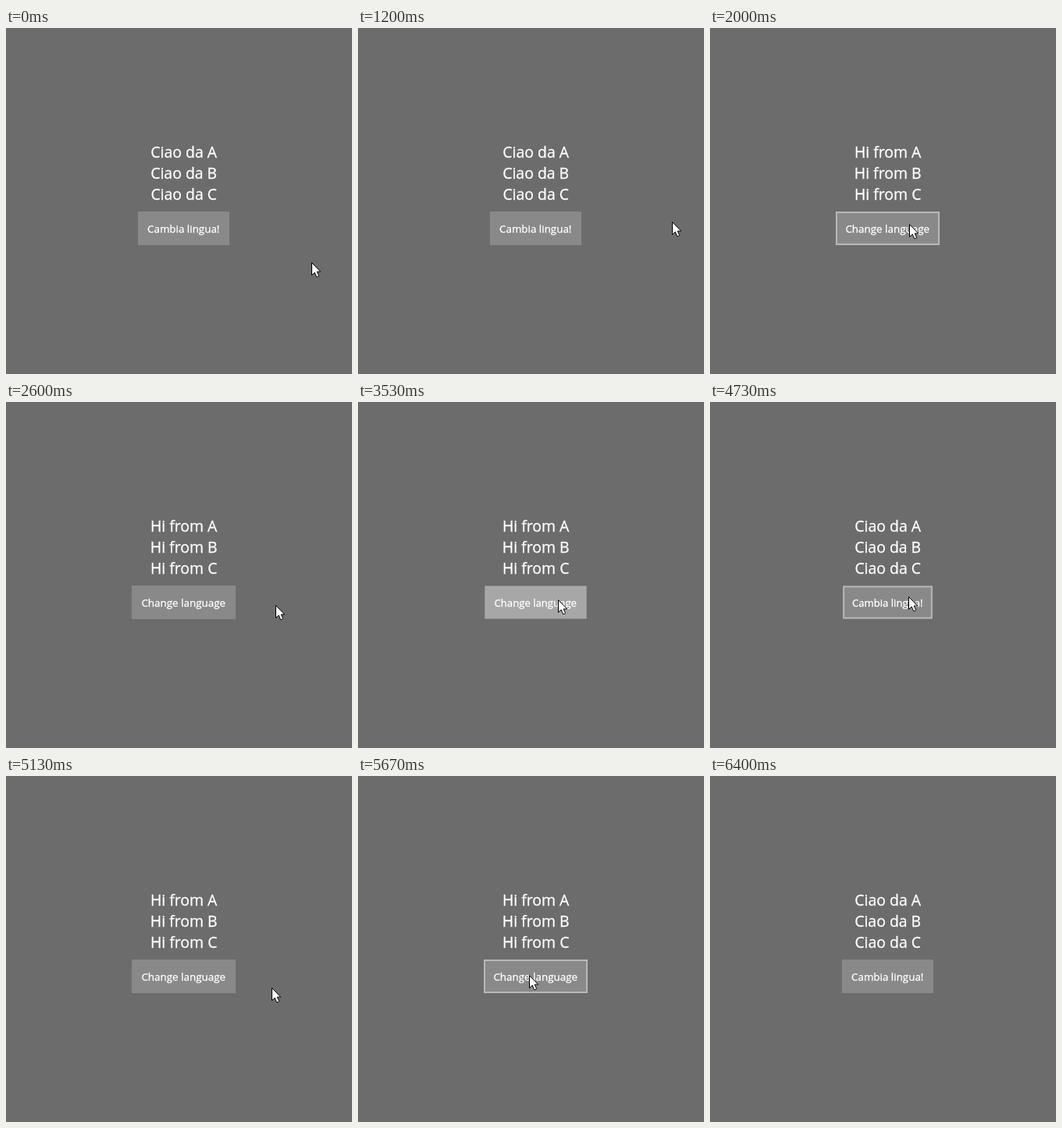
These frames come from a looping animation (443 px wide and 443 px high, 6.87 s). An HTML page:

```html
<!DOCTYPE html>
<html lang="it">
<head>
<meta charset="utf-8">
<title>Cambia lingua</title>
<style>
  html, body { margin: 0; width: 100%; height: 100%; overflow: hidden; background: #6c6c6c; }
  svg { display: block; width: 100%; height: 100%; }
  text {
    font-family: "Open Sans", "Noto Sans", sans-serif;
    fill: #fff; stroke: #fff; stroke-width: .3; text-anchor: middle;
  }
  .greeting { font-size: 19.4px; }
  .label { font-size: 13.4px; }
</style>
</head>
<body>
<svg viewBox="0 0 443 443">
  <text class="greeting" x="227.7" y="166"></text>
  <text class="greeting" x="227.7" y="193"></text>
  <text class="greeting" x="227.7" y="220"></text>
  <g id="button">
    <rect id="face" y="-21.5" height="43" fill="#fff"/>
    <rect id="border" y="-20.5" height="41" fill="none" stroke="#fff" stroke-opacity=".4" stroke-width="2"/>
    <text id="label" class="label" x="-.3" y="5.5"></text>
  </g>
  <path id="cursor" d="M.5 .5V16.5L4.2 13L6.5 18.5H8.5L9.5 17L7.2 12H11.7Z" fill="#fff" stroke="#000" stroke-linejoin="round"/>
</svg>
<script>
const LOOP = 6870, STEP = 1000 / 15;
const CENTER = { x: 227.5, y: 256.5 };
const ITALIAN = { greeting: "Ciao da ", label: "Cambia lingua!", width: 117 };
const ENGLISH = { greeting: "Hi from ", label: "Change language", width: 133 };
const REST = 3, PRESS = 2;  // steps on the button before a press, and held down

const spot = (step, x, y) => ({ step, x, y });
const clicks = [spot(28, 255, 251), spot(52, 256, 253), spot(71, 254, 249), spot(87, 219, 255)];
// The pointer enters at the first turn, swings out between clicks and leaves at the last
const turns = [spot(18, 402, 248), spot(43, 371, 263), spot(65, 370, 276), spot(80, 395, 286), spot(95, 59, 432)];
const stops = turns.flatMap((turn, i) => {
  const click = clicks[i];
  return click
    ? [turn, { ...click, step: click.step - REST }, { ...click, step: click.step + PRESS }]
    : [turn];
});

const $ = id => document.getElementById(id);
const greetings = [...document.querySelectorAll(".greeting")];
const ease = u => u * u * (3 - 2 * u);
const setAttrs = (el, attrs) => {
  for (const name in attrs) el.setAttribute(name, attrs[name]);
};

function pointerAt(step) {
  if (step < 1) return { x: 391, y: 300 };
  const next = stops.findIndex(stop => stop.step > step);
  if (next === 0) return null;
  if (next < 0) return stops.at(-1).step === step ? stops.at(-1) : null;
  const a = stops[next - 1], b = stops[next];
  const u = ease((step - a.step) / (b.step - a.step));
  return { x: Math.round(a.x + (b.x - a.x) * u), y: Math.round(a.y + (b.y - a.y) * u) };
}

function draw(time) {
  const step = Math.floor((time + 4) / STEP);
  const pointer = pointerAt(step);
  const released = clicks.filter(click => step >= click.step + PRESS).length;
  const words = released % 2 ? ENGLISH : ITALIAN;
  const next = clicks[released];
  const tilted = next && step >= next.step;
  const pressed = next && step > next.step;
  const hover = pointer && Math.abs(pointer.x - CENTER.x) < words.width / 2
    && Math.abs(pointer.y - CENTER.y) < 21.5;

  greetings.forEach((el, i) => el.textContent = words.greeting + "ABC"[i]);
  $("label").textContent = words.label;
  setAttrs($("face"), { x: -words.width / 2, width: words.width, "fill-opacity": pressed ? .4 : .2 });
  setAttrs($("border"), {
    x: 1 - words.width / 2, width: words.width - 2,
    visibility: hover && !pressed ? "visible" : "hidden"
  });
  setAttrs($("button"), {
    transform: `translate(${CENTER.x} ${CENTER.y}) scale(${tilted ? .98 : 1})`
  });
  setAttrs($("cursor"), {
    visibility: pointer ? "visible" : "hidden",
    transform: pointer ? `translate(${pointer.x} ${pointer.y})` : ""
  });
}

const start = performance.now();
function tick() {
  draw((performance.now() - start) % LOOP);
  requestAnimationFrame(tick);
}
tick();
</script>
</body>
</html>
```
